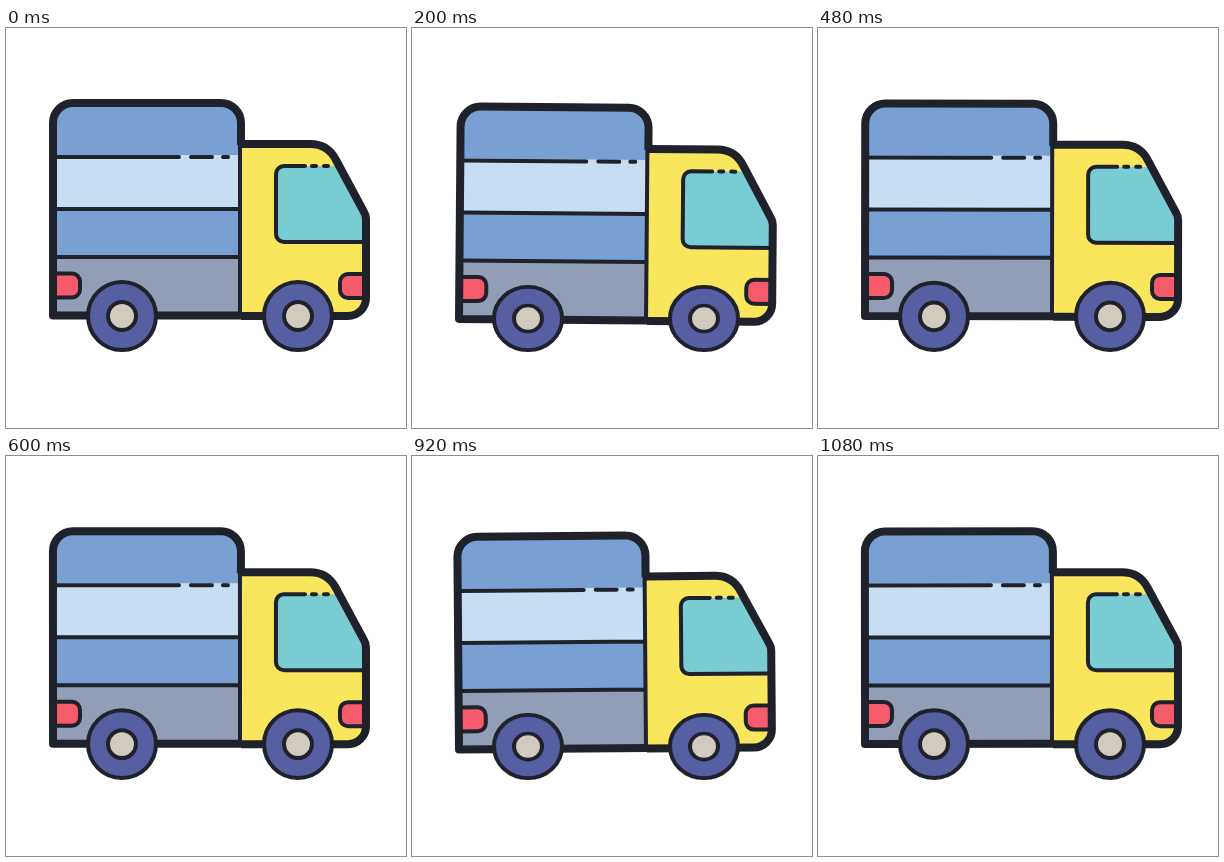
An HTML page that plays this animation: 400x400 px, repeating every 1.12 s.

```html
<!DOCTYPE html>
<html lang="en">
<head>
<meta charset="utf-8">
<title>Truck</title>
<style>
  html, body { margin: 0; height: 100%; overflow: hidden; background: #fff; }
  svg { display: block; width: 100vw; height: 100vh; }
  .line { fill: none; stroke: #1f212b; stroke-width: 4; stroke-linecap: round; stroke-linejoin: round; }
  .thick { stroke-width: 8; stroke-linecap: butt; }
</style>
</head>
<body>
<svg viewBox="0 0 400 400">
  <defs>
    <clipPath id="box"><path d="M47 288V95a20 20 0 0 1 20-20H215a20 20 0 0 1 20 20V288z"/></clipPath>
    <g id="wheel" class="line">
      <circle cy="-36" r="34" style="fill:#565fa1"/>
      <circle cy="-36" r="14" style="fill:#d0cbbe"/>
    </g>
  </defs>

  <g id="body">
    <path fill="#f9e65c" d="M235 116H304Q322 116 330 132L358 184Q360 187 360 191V270a18 18 0 0 1-18 18H235z"/>
    <path fill="#78ccd2" d="M270 146a8 8 0 0 1 8-8H333L358 184L360 191V214H278a8 8 0 0 1-8-8z"/>
    <path class="line" d="M299 138H278a8 8 0 0 0-8 8V206a8 8 0 0 0 8 8H360M306 138H310M318 138H322"/>
    <path class="line" fill="#f55b6a" style="fill:#f55b6a" d="M360 246H342a8 8 0 0 0-8 8V262a8 8 0 0 0 8 8H360"/>

    <g clip-path="url(#box)">
      <path fill="#78a0d3" d="M47 75H235V288H47z"/>
      <path fill="#c7ddf1" d="M47 127H235V181H47z"/>
      <path fill="#919eb6" d="M47 229H235V288H47z"/>
    </g>
    <path class="line" d="M49 129H173M185 129H206M217 129H222M49 181H232M49 229H232M234 116V288"/>
    <path class="line" style="fill:#f55b6a" d="M49 245.500H66a8 8 0 0 1 8 8V261.500a8 8 0 0 1-8 8H49"/>

    <path class="line thick" d="M235 117V95a20 20 0 0 0-20-20H67a20 20 0 0 0-20 20V287.500H235"/>
    <path class="line thick" d="M235 116H304Q322 116 330 132L358 184Q360 187 360 191V270a18 18 0 0 1-18 18H235"/>
  </g>

  <g id="rear"><use href="#wheel"/></g>
  <g id="front"><use href="#wheel"/></g>
</svg>
<script>
  const LOOP = 1120, HALF = LOOP / 2, PEAK = 240;
  const DROP = 5, TILT = 0.5, SQUASH = 0.075;
  const place = (id, transform) => document.getElementById(id).setAttribute("transform", transform);

  // Sine-eased dip, 0 to 1 and back, deepest at the peak time
  function dip(t) {
    const phase = t < PEAK ? t / PEAK : (HALF - t) / (HALF - PEAK);
    return (1 - Math.cos(Math.PI * phase)) / 2;
  }

  function draw(now) {
    const t = now % LOOP;
    // The second half mirrors the first in time and leans the other way
    const forward = t < HALF;
    const d = dip(forward ? t : LOOP - t);
    const tilt = (forward ? TILT : -TILT) * d;
    place("body", `translate(0 ${DROP * d}) rotate(${tilt} 204 288)`);
    const squash = `scale(1 ${1 - SQUASH * d})`;
    place("rear", `translate(116 324) ${squash}`);
    place("front", `translate(292 324) ${squash}`);
  }

  const start = performance.now();
  function tick() {
    draw(performance.now() - start);
    requestAnimationFrame(tick);
  }
  tick();
</script>
</body>
</html>
```
